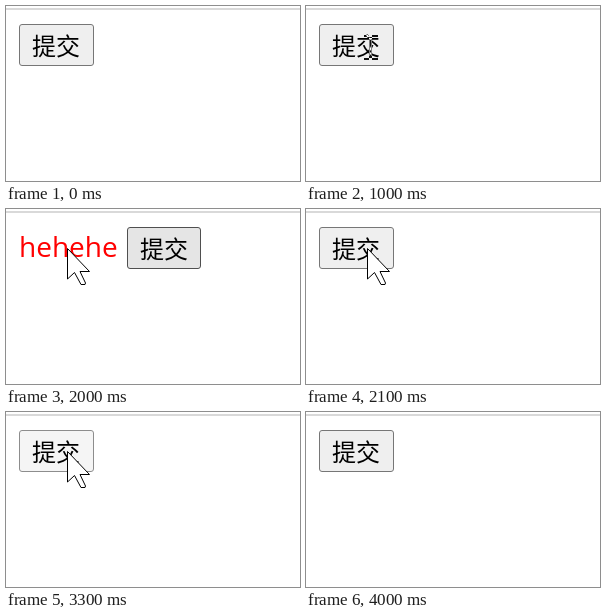
Animation of 294 by 175 pixels, one loop 4.5 s. Source, as an HTML page:

```html
<!DOCTYPE html>
<html lang="zh-CN">
<head>
<meta charset="utf-8">
<title>提交</title>
<style>
  html, body { margin: 0; width: 100%; height: 100%; overflow: hidden; background: #fff; }
  svg { display: block; width: 294px; height: 175px; isolation: isolate; }
  .anim { animation: 4500ms step-end infinite; }

  .face { fill: #efefef; stroke: #767676; width: 74px; animation-name: face; }
  .label { font: 24px "Noto Sans CJK SC", "Noto Sans CJK", sans-serif; animation-name: shift; }
  .message { font: 28px "Open Sans", "Noto Sans", sans-serif; fill: #f00; visibility: hidden; animation-name: message; }
  .arrow { fill: #fff; stroke: #000; visibility: hidden; animation-name: arrow; }
  .beam { fill: none; stroke: #fff; stroke-width: 2; mix-blend-mode: difference; visibility: hidden; animation-name: beam; }

  /* idle, hover, pressed; the message pushes the button right */
  @keyframes face {
    0%, 22.22%, 46.66%, 64.44%, 80%, 100% { fill: #efefef; stroke: #767676; width: 74px; transform: none; }
    11.11% { fill: #e5e5e5; stroke: #4f4f4f; }
    17.77%, 40%, 60%, 73.33% { fill: #f5f5f5; stroke: #8d8d8d; width: 74px; transform: none; }
    44.44%, 62.22%, 77.77% { fill: #e5e5e5; stroke: #4f4f4f; width: 73px; transform: translateX(108px); }
  }
  @keyframes shift {
    0%, 46.66%, 64.44%, 80%, 100% { transform: none; }
    44.44%, 62.22%, 77.77% { transform: translateX(108px); }
  }
  @keyframes message {
    0%, 46.66%, 64.44%, 80%, 100% { visibility: hidden; }
    44.44%, 62.22%, 77.77% { visibility: visible; }
  }
  @keyframes arrow {
    0%, 88.88%, 100% { visibility: hidden; transform: none; }
    4.44% { visibility: visible; transform: translate(226px, 63px); }
    6.66% { visibility: visible; transform: translate(165px, 55px); }
    8.88% { visibility: visible; transform: translate(110px, 46px); }
    11.11% { visibility: visible; transform: translate(75px, 41px); }
    13.33%, 40% { visibility: visible; transform: translate(61px, 39px); }
    22.22% { visibility: hidden; transform: translate(61px, 39px); }
    84.44% { visibility: visible; transform: translate(130px, 70px); }
    86.66% { visibility: visible; transform: translate(274px, 112px); }
  }
  @keyframes beam {
    0%, 40%, 100% { visibility: hidden; transform: none; }
    22.22% { visibility: visible; transform: translate(58px, 29px); }
    37.77% { visibility: visible; transform: translate(57px, 28px); }
  }
</style>
</head>
<body>
<svg viewBox="0 0 294 175">
  <rect width="294" height="175" fill="#fff"/>
  <rect y="2" width="294" height="2" fill="#d9d9d9"/>
  <text class="anim message" x="13" y="48">hehehe</text>
  <rect class="anim face" x="13.5" y="18.5" height="41" rx="2.5"/>
  <text class="anim label" x="26" y="49">提交</text>
  <path class="anim beam" d="M0 1H5M8 1H14M5 3H8M6.5 4V21M5 22H8M0 24H5M8 24H14"/>
  <path class="anim arrow" d="M.5 .5V31L7.5 24.5L14 36.5H18L18.5 35L13 23.5H22.5Z"/>
</svg>
</body>
</html>
```
